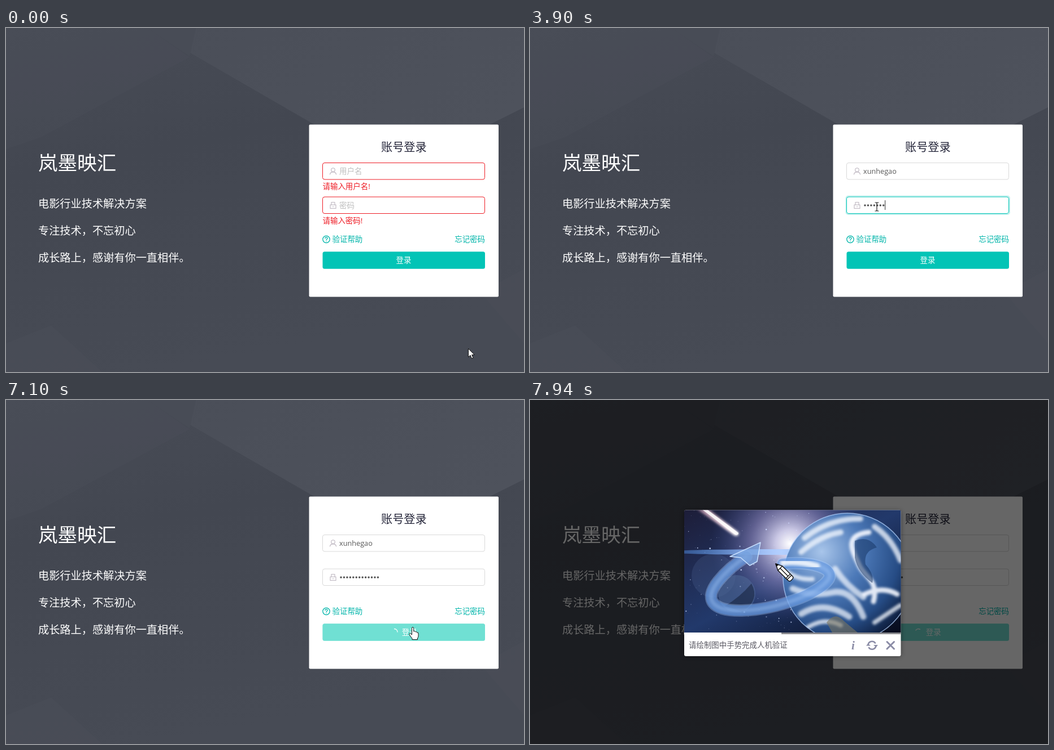
These frames come from a looping animation (917x611 px, 8 s). An HTML page:

```html
<!DOCTYPE html>
<html lang="zh">
<head>
<meta charset="utf-8">
<style>
html, body { margin: 0; width: 100%; height: 100%; overflow: hidden; background: #454953; }
svg { display: block; width: 100%; height: 100%; }
text { font-family: "Open Sans", "Noto Sans CJK SC", "Noto Sans CJK", sans-serif; font-size: 13.44px; }
.slogan { font-size: 19.2px; fill: #fff; }
.error { fill: #ee1c25; }
.hint { fill: #bfbfbf; }
.link { fill: #00b5aa; }
.line { fill: none; stroke-linecap: round; stroke-linejoin: round; }
</style>
</head>
<body>
<svg viewBox="0 0 917 611">
  <defs>
    <linearGradient id="base" x2="0.3" y2="1">
      <stop offset="0" stop-color="#484c56"/><stop offset=".4" stop-color="#434751"/><stop offset="1" stop-color="#474b55"/>
    </linearGradient>
    <linearGradient id="facet" x2="1" y2=".5">
      <stop offset="0" stop-color="#4a4e58"/><stop offset="1" stop-color="#4e525c"/>
    </linearGradient>
    <linearGradient id="space" x2="1" y2="1">
      <stop offset="0" stop-color="#1d1d38"/><stop offset=".5" stop-color="#22396b"/><stop offset="1" stop-color="#070b1c"/>
    </linearGradient>
    <radialGradient id="flare">
      <stop offset="0" stop-color="#fff"/><stop offset=".18" stop-color="#dcd8f4" stop-opacity=".9"/>
      <stop offset=".5" stop-color="#8d86bd" stop-opacity=".6"/><stop offset="1" stop-color="#3b4b8c" stop-opacity="0"/>
    </radialGradient>
    <radialGradient id="globe" cx=".3" cy=".3" r=".8">
      <stop offset="0" stop-color="#a8c5ea"/><stop offset=".4" stop-color="#4c79b8"/><stop offset=".75" stop-color="#264c85"/><stop offset="1" stop-color="#0c1a38"/>
    </radialGradient>
    <linearGradient id="tail" gradientUnits="userSpaceOnUse" x1="298" y1="194" x2="370" y2="240">
      <stop offset="0" stop-color="#d5a5bd" stop-opacity=".7"/><stop offset=".7" stop-color="#ffe9ef"/><stop offset="1" stop-color="#fff"/>
    </linearGradient>
    <linearGradient id="streak">
      <stop offset="0" stop-color="#3f8cf0" stop-opacity=".3"/><stop offset=".5" stop-color="#b4d0ff"/><stop offset="1" stop-color="#3f8cf0" stop-opacity="0"/>
    </linearGradient>
    <filter id="soft" x="-20%" y="-20%" width="140%" height="140%"><feGaussianBlur stdDeviation="2"/></filter>
    <filter id="shade" x="-10%" y="-10%" width="120%" height="120%"><feGaussianBlur stdDeviation="4"/></filter>
    <clipPath id="photoClip"><path d="M273 413V198q0-2.500 2.500-2.500H654q2.500 0 2.500 2.500V413z"/></clipPath>
    <clipPath id="globeClip"><circle cx="562" cy="315" r="114"/></clipPath>
    <path id="ribbon" d="M447 291C500 286 541 299 528 319C512 343 440 372 375 374C323 375 307 355 333 322Q352 298 383 278"/>
  </defs>

  <rect width="917" height="611" fill="url(#base)"/>
  <path d="M250 0H917V141L690 255Z" fill="url(#facet)"/>
  <path d="M250 0H336L325 50Z" fill="#484c56"/>
  <path d="M325 52L60 195L0 215V0H250Z" fill="#4b4f59" opacity=".35"/>
  <path d="M917 428L840 470L917 560ZM0 560L80 528L170 611H0Z" fill="#4d515b" opacity=".3"/>

  <text x="57" y="252" fill="#fff" style="font-size:34.56px">岚墨映汇</text>
  <text class="slogan" x="57" y="319">电影行业技术解决方案</text>
  <text class="slogan" x="57" y="367">专注技术，不忘初心</text>
  <text class="slogan" x="57" y="415">成长路上，感谢有你一直相伴。</text>

  <rect x="536.500" y="171.500" width="335.500" height="306" rx="2" fill="#fff"/>
  <text x="704.300" y="219.300" text-anchor="middle" fill="#25263a" style="font-size:20.16px">账号登录</text>

  <rect id="userGlow" x="559.500" y="238" width="289.500" height="32.500" rx="4" fill="none" stroke-width="2"/>
  <rect id="userBox" x="560.500" y="239.500" width="287" height="29.500" rx="3.500" fill="#fff"/>
  <rect id="passGlow" x="559.500" y="298.500" width="289.500" height="32.500" rx="4" fill="none" stroke-width="2"/>
  <rect id="passBox" x="560.500" y="300" width="287" height="29.500" rx="3.500" fill="#fff"/>
  <g class="line" stroke="#bdb6c0" stroke-width="1.100">
    <circle cx="579" cy="252" r="3.300"/><path d="M573.500 260C574 254.500 584 254.500 584.500 260"/>
    <rect x="574" y="314" width="10" height="6.500"/><path d="M576 314V309.500H582V314M579 316.500V318"/>
  </g>
  <text class="hint" id="userHint" x="590" y="259.300">用户名</text>
  <text class="hint" id="passHint" x="590" y="319.600">密码</text>
  <text id="userText" x="590" y="259" fill="#595959" style="font-size:12.700px"></text>
  <g id="dots" fill="#505050"></g>
  <rect id="caret" width="1" height="17" fill="#333"/>
  <text class="error" id="userError" x="560.500" y="286.300">请输入用户名!</text>
  <text class="error" id="passError" x="560.500" y="346.500">请输入密码!</text>

  <g class="line" stroke="#00b5aa" stroke-width="1.300">
    <circle cx="567" cy="375.300" r="6.200"/><path d="M565 373.700C565 371 569 371 569 373.500C569 375 567 375 567 376.500M567 378.600V378.700"/>
  </g>
  <text class="link" x="577.500" y="380.300">验证帮助</text>
  <text class="link" x="794.200" y="380.300">忘记密码</text>

  <rect id="wave" fill="none" stroke="#03c4b6"/>
  <rect id="button" x="560.500" y="397.300" width="287.500" height="30.500" rx="3.500"/>
  <path id="spinner" class="line" d="M0 -5.500A5.500 5.500 0 0 1 5.500 0" stroke="#fff" stroke-width="1.300"/>
  <text id="buttonText" y="417.300" fill="#fff">登录</text>
  <rect id="veil" x="560.500" y="397.300" width="287.500" height="30.500" rx="3.500" fill="#fff"/>

  <rect id="overlay" width="917" height="611" opacity=".6"/>
  <g id="popup">
    <rect x="273" y="197" width="383.500" height="258" rx="3" opacity=".4" filter="url(#shade)"/>
    <rect x="273" y="195.500" width="383.500" height="259.500" rx="3" fill="#fff"/>
    <g clip-path="url(#photoClip)">
      <rect x="273" y="195" width="384" height="218" fill="url(#space)"/>
      <circle cx="460" cy="255" r="140" fill="url(#flare)"/>
      <g id="stars" fill="#cfdcff"></g>
      <ellipse cx="445" cy="270" rx="210" ry="5" fill="url(#streak)"/>
      <path d="M296 194L316 194L369 235Q371 243 362 241Z" fill="url(#tail)" filter="url(#soft)"/>
      <path d="M304 194L313 194L369 236Q369 241 363 239Z" fill="#fff" opacity=".85"/>
      <circle cx="325" cy="312" r="39" fill="#7390c0" opacity=".15"/>
      <circle cx="366" cy="344" r="33" fill="#506b98" opacity=".55"/>
      <path d="M345 366Q372 350 392 326Q408 355 376 376Z" fill="#101a32" opacity=".5"/>
      <circle cx="562" cy="315" r="114" fill="url(#globe)"/>
      <g clip-path="url(#globeClip)">
        <g class="line" stroke="#f4f8ff" filter="url(#soft)">
          <path d="M486 245Q530 210 585 211M480 270Q515 240 550 235M610 225Q640 245 656 285" stroke-width="10" opacity=".75"/>
          <path d="M600 235C550 240 575 275 583 294S618 320 608 358M592 345Q625 330 650 345" stroke-width="9" opacity=".9"/>
          <path d="M465 335Q500 350 535 342T590 385M480 380Q520 355 565 385M540 300Q560 330 590 350" stroke-width="11" opacity=".7"/>
          <path d="M490 405Q520 385 550 400M610 395L655 365M455 305Q475 320 500 318" stroke-width="8" opacity=".75"/>
        </g>
        <path d="M525 395Q540 375 555 392L580 413H535Z" fill="#7b7660" opacity=".6"/>
        <path d="M575 250Q600 240 614 262Q590 268 594 292Q610 310 606 325Q580 306 575 280Z" fill="#183867" opacity=".55"/>
      </g>
      <circle cx="562" cy="315" r="114" fill="none" stroke="#b6d5ff" stroke-width="1.500" opacity=".7"/>
      <g class="line">
        <use href="#ribbon" stroke="#a7ccff" stroke-width="22" opacity=".35"/>
        <use href="#ribbon" stroke="#5c92dd" stroke-width="18" opacity=".6"/>
        <use href="#ribbon" stroke="#a9cbf8" stroke-width="7" opacity=".35" filter="url(#soft)"/>
        <path d="M408 253L354 278L373 280L389 294L402 287Z" fill="#7aa5df" fill-opacity=".75" stroke="#c8e0ff" stroke-width="1.500"/>
        <path d="M448 289Q475 285 508 295" stroke="#fff" stroke-width="11" opacity=".8" filter="url(#soft)"/>
      </g>
    </g>
    <rect id="bar" y="413" height="3" fill="#8b8b8f"/>
    <text x="281" y="440.300" fill="#595862">请绘制图中手势完成人机验证</text>
    <text x="569" y="443" fill="#8b8ca6" style="font:italic bold 21px 'Liberation Serif',serif">i</text>
    <g class="line" stroke="#8b8ca6" stroke-width="2.600">
      <path d="M598.500 435A7 7 0 0 1 611 431.500M612.500 436.500A7 7 0 0 1 600 440"/>
      <path d="M632 429.500L644.500 442M644.500 429.500L632 442" stroke-width="3"/>
    </g>
    <path d="M608 435H616L612.500 439ZM595 436.500H603L598.500 432.500Z" fill="#8b8ca6"/>
  </g>

  <g id="cursor">
    <path id="arrow" d="M.5 .5V15.500L4 12.300L6.500 18L9 17L6.600 11.500H11.200Z" fill="#fff" stroke="#111"/>
    <path id="beam" class="line" d="M-3 -7H-1L0 -6L1 -7H3M0 -6V7M-3 8H-1L0 7L1 8H3" stroke="#222" stroke-width="1.200"/>
    <path id="hand" d="M-1.500 1.500Q-1.500 -.5 0 -.5T1.700 1.500V7Q4 5.800 4.700 7.800Q7 6.800 7.500 9Q10 8 10 11V15Q10 17.500 8.500 19V21.500H-1V19.500Q-4 16 -6 12.500Q-6 9.500 -3.500 11L-1.500 13Z" fill="#fff" stroke="#111"/>
    <g id="pencil" transform="rotate(45)" fill="#fff" stroke="#111" stroke-width="1.400" stroke-linejoin="round">
      <path d="M0 0L11 -5.500H36Q40 -5.500 40 -2V2Q40 5.500 36 5.500H11Z"/>
      <path d="M11 -5.500V5.500M11 0H31M31 -5.500V5.500M34 -5.500V5.500" fill="none"/><path d="M0 0L4 -2V2Z" fill="#111"/>
    </g>
  </g>
</svg>
<script>
const LOOP = 8000;
const NAME = "xunhegao";
const nameKeys = [720, 790, 860, 1020, 1160, 1390, 1560, 1650];
const passKeys = [2000, 2420, 2590, 2800, 3580, 3810, 3900, 4220, 4370, 4520, 4680, 4750, 4830];
const path = [[0, 818, 569], [70, 818, 569], [600, 614, 256], [1930, 614, 256], [1990, 614, 317],
  [5450, 614, 317], [5660, 722, 440], [5800, 722, 440], [5890, 720, 404], [7240, 720, 404],
  [7480, 500, 330], [7800, 435, 291], [LOOP, 435, 291]];
const USER_FOCUS = 620, PASS_FOCUS = 1970, PRESS = 5960, CLICK = 6250, DIM = 7170, POPUP = 7240;
const TEAL = [3, 196, 182], HOVER = [35, 207, 187], ACTIVE = [0, 157, 148];
const GREY = [217, 217, 217], RED = [238, 28, 37];

const ui = {};
document.querySelectorAll("[id]").forEach(el => ui[el.id] = el);
const set = (el, attrs) => { for (const k in attrs) el.setAttribute(k, attrs[k]); };
const show = (el, on) => el.style.display = on ? "" : "none";
const ramp = (t, start, length) => Math.min(1, Math.max(0, (t - start) / length));
const mix = (a, b, k) => a.map((v, i) => v + (b[i] - v) * k);
const rgb = c => `rgb(${c.map(Math.round)})`;
const typed = (keys, t) => keys.filter(k => k <= t).length;

function add(parent, attrs) {
  const dot = document.createElementNS("http://www.w3.org/2000/svg", "circle");
  set(dot, attrs);
  parent.append(dot);
}
passKeys.forEach((_, i) => add(ui.dots, { cx: 593 + 5.45 * i, cy: 315, r: 1.75 }));
let seed = 7;
const random = () => (seed = seed * 16807 % 2147483647) / 2147483647;
for (let i = 0; i < 170; i++) {
  add(ui.stars, { cx: 273 + random() * 230, cy: 196 + random() * 217, r: 0.3 + random() ** 4 * 1.2, opacity: 0.3 + random() * 0.6 });
}

function pointer(t) {
  const i = path.findIndex(p => p[0] > t);
  const [a, b] = [path[i - 1], path[i]];
  return mix(a, b, (t - a[0]) / (b[0] - a[0])).slice(1);
}

function drawPointer(t) {
  const [x, y] = pointer(t);
  const inside = (l, top, r, bottom) => x > l && x < r && y > top && y < bottom;
  const kind = t >= POPUP && inside(273, 195, 657, 413) ? "pencil"
    : inside(560, 397, 848, 428) ? "hand"
    : inside(560, 239, 848, 269) || inside(560, 300, 848, 330) ? "beam" : "arrow";
  for (const k of ["arrow", "beam", "hand", "pencil"]) show(ui[k], k === kind);
  ui.cursor.setAttribute("transform", `translate(${x} ${y})`);
  return kind;
}

function drawField(name, border, glow, color) {
  ui[name + "Box"].setAttribute("stroke", rgb(border));
  set(ui[name + "Glow"], { stroke: rgb(color), opacity: 0.25 * glow });
}

function drawFields(t) {
  const n = typed(nameKeys, t), p = typed(passKeys, t);
  const valid = ramp(t, nameKeys[0], 140);
  const userBlur = ramp(t, PASS_FOCUS, 60), passBlur = ramp(t, PRESS, 250);
  const userColor = mix(RED, TEAL, valid);
  drawField("user", mix(userColor, GREY, userBlur), ramp(t, USER_FOCUS, 100) * (1 - userBlur), userColor);
  drawField("pass", mix(mix(RED, TEAL, ramp(t, PASS_FOCUS, 60)), GREY, passBlur),
    ramp(t, 2030, 220) * (1 - ramp(t, PRESS, 100)), TEAL);
  show(ui.userHint, !n);
  show(ui.passHint, !p);
  ui.userError.setAttribute("opacity", 1 - valid);
  ui.passError.setAttribute("opacity", 1 - ramp(t, PASS_FOCUS, 55));
  ui.userText.textContent = NAME.slice(0, n);
  [...ui.dots.children].forEach((d, i) => show(d, i < p));

  const inUser = t >= USER_FOCUS && t < PASS_FOCUS, inPass = t >= 2100 && t < PRESS;
  const last = inUser ? nameKeys[n - 1] || USER_FOCUS : passKeys[p - 1];
  show(ui.caret, (inUser || inPass) && (t - last) % 1060 < 530);
  set(ui.caret, inUser ? { x: 590 + (n && ui.userText.getComputedTextLength()), y: 245.5 }
    : { x: 590 + 5.45 * p, y: 306 });
}

function drawButton(t, hovered) {
  const loading = ramp(t, CLICK, 250);
  let color = hovered ? HOVER : TEAL;
  if (t >= PASS_FOCUS && t < 2250) color = mix(HOVER, TEAL, ramp(t, 2040, 200));
  if (t >= PRESS) color = mix(mix(HOVER, ACTIVE, ramp(t, PRESS, 100)), HOVER, loading);
  ui.button.setAttribute("fill", rgb(color));
  ui.buttonText.setAttribute("x", 690.5 + 10.3 * loading);
  ui.veil.setAttribute("opacity", 0.35 * loading);
  set(ui.spinner, {
    opacity: loading,
    transform: `translate(687.5 412) rotate(${(t - 7100) * 0.36})`
  });
  const w = ramp(t, CLICK, 380), s = 4 * w;
  set(ui.wave, {
    x: 560.5 - s / 2, y: 397.3 - s / 2, width: 287.5 + s, height: 30.5 + s, rx: 3.5 + s / 2,
    "stroke-width": s, opacity: w > 0 ? 0.35 * (1 - w) : 0
  });
}

function render(t) {
  drawFields(t);
  drawButton(t, drawPointer(t) === "hand");
  show(ui.overlay, t >= DIM);
  show(ui.popup, t >= POPUP);
  ui.popup.setAttribute("opacity", ramp(t, POPUP - 60, 200));
  const edge = 656.5 - 211.5 * ramp(t, 7300, 640);
  set(ui.bar, { x: edge, width: 656.5 - edge });
}

const start = performance.now();
function frame() {
  render((performance.now() - start) % LOOP);
  requestAnimationFrame(frame);
}
frame();
</script>
</body>
</html>
```
